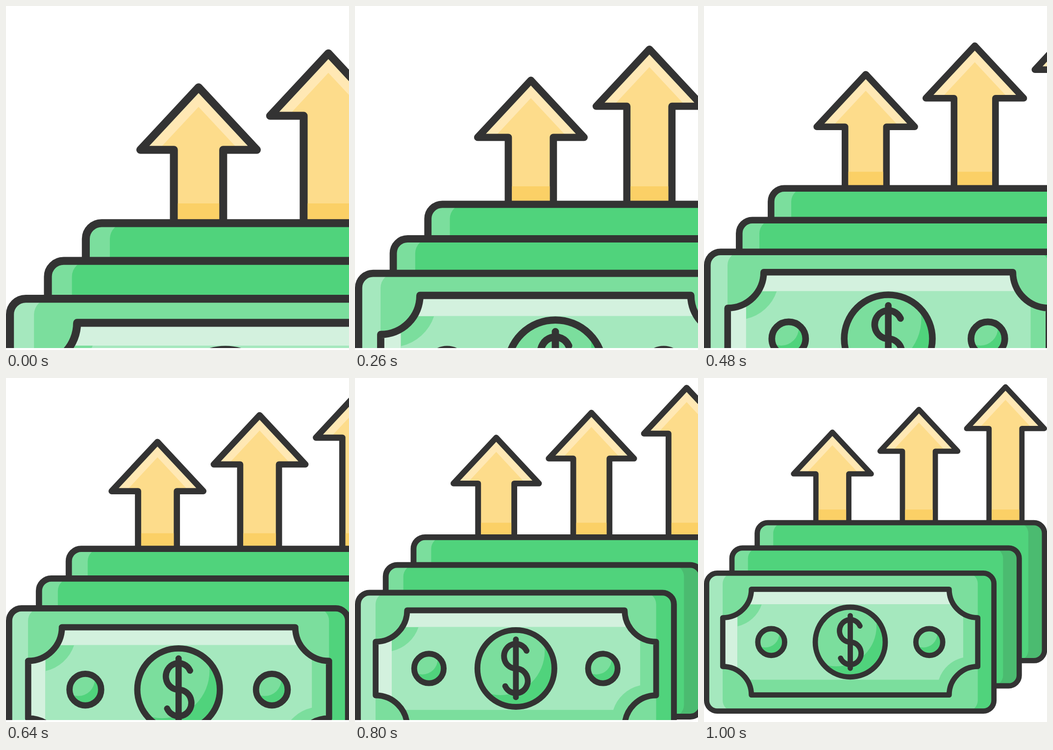
An HTML page for the animation above (1.6 s loop, 700 by 704 pixels).

```html
<!DOCTYPE html>
<html lang="en">
<head>
<meta charset="utf-8">
<title>Growing money</title>
<style>
  html, body { margin: 0; width: 100%; height: 100%; overflow: hidden; background: #fff; }
  svg { display: block; }
  .line { fill: none; stroke: #333; stroke-width: 10.8; stroke-linecap: round; stroke-linejoin: round; }
  .pale { fill: #d3f1de; }
  .mint { fill: #a5e8be; }
  .light { fill: #7bde9d; }
  .green { fill: #50d37c; }
  .deep { fill: #4bbb70; }
</style>
</head>
<body>
<svg width="700" height="700" viewBox="0 0 700 700">
  <defs>
    <rect id="note" x="5.4" y="399.4" width="586.3" height="282.2" rx="21.5"/>
    <rect id="middle" x="38.1" y="399.4" width="520.6" height="282.2" rx="21.5"/>
    <path id="right" d="M500 399.4H570.2a21.5 21.5 0 0 1 21.5 21.5V660.1a21.5 21.5 0 0 1-21.5 21.5H500z"/>

    <g id="backNote">
      <use href="#note" class="light"/>
      <use href="#right" class="deep"/>
      <use href="#middle" class="green"/>
      <use href="#note" class="line"/>
    </g>

    <path id="arrowShape" d="M228.4 420V196.2H182.7L262 110.9L341.3 196.2H295.5V420"/>
    <g id="arrow">
      <use href="#arrowShape" fill="#ffe8b4"/>
      <path fill="#fddc8b" d="M228.4 420V196.2H207.5L262 137.6L316.5 196.2H295.5V420"/>
      <use href="#arrowShape" class="line"/>
    </g>

    <path id="frame" d="M96.7 432.3H500.3A58.4 58.4 0 0 0 558.7 490.6V590.4A58.4 58.4 0 0 0 500.3 648.7H96.7A58.4 58.4 0 0 0 38.3 590.4V490.6A58.4 58.4 0 0 0 96.7 432.3z"/>
    <clipPath id="inFrame"><use href="#frame"/></clipPath>

    <circle id="coin" cx="298.5" cy="540.4" r="71.4"/>
    <clipPath id="inCoin"><use href="#coin"/></clipPath>

    <circle id="dot" cx="137.2" cy="540.4" r="27.4"/>
    <clipPath id="inDot"><use href="#dot"/></clipPath>
    <g id="button">
      <use href="#dot" class="green"/>
      <circle cx="125" cy="523" r="28.5" class="light" clip-path="url(#inDot)"/>
      <use href="#dot" class="line"/>
    </g>
  </defs>

  <g id="scene">
    <use href="#arrow"/>
    <use href="#arrow" x="176.6" y="-46.4"/>
    <use href="#arrow" x="353.3" y="-92.8"/>
    <path fill="#fbd066" d="M233.8 269.3h56.3v24h-56.3zM410.4 269.3h56.3v24h-56.3zM587.1 269.3h56.3v24h-56.3z"/>

    <use href="#backNote" x="103.2" y="-103.2"/>
    <use href="#backNote" x="51.6" y="-51.6"/>

    <use href="#note" class="mint"/>
    <use href="#right" class="green"/>
    <use href="#middle" class="light"/>
    <use href="#note" class="line"/>

    <g clip-path="url(#inFrame)">
      <use href="#frame" class="pale"/>
      <path class="light" d="M68.2 463.3H560V650H68.2z"/>
      <path class="mint" d="M117.8 463.3H529V571.9A68 68 0 0 0 479.2 617.4H68.2V508.2A68 68 0 0 0 117.8 463.3z"/>
    </g>
    <use href="#frame" class="line"/>

    <use href="#button"/>
    <use href="#button" x="322.6"/>

    <use href="#coin" class="green"/>
    <circle cx="270" cy="508" r="82" class="light" clip-path="url(#inCoin)"/>
    <use href="#coin" class="line"/>
    <path class="line" d="M298.5 486.4V594M318.3 507.5A22 23 0 1 0 298.5 540.5A22 23 0 1 1 278.7 573.3"/>
  </g>
</svg>
<script>
  const LOOP = 1600, ZOOM = 1000, STEP = 20;
  const scene = document.getElementById('scene');
  const start = performance.now();

  function draw() {
    const t = (performance.now() - start) % LOOP;
    const stepped = Math.min(Math.floor(t / STEP) * STEP, ZOOM);
    scene.setAttribute('transform', `scale(${1.5 - 0.5 * stepped / ZOOM})`);
    requestAnimationFrame(draw);
  }
  draw();
</script>
</body>
</html>
```
